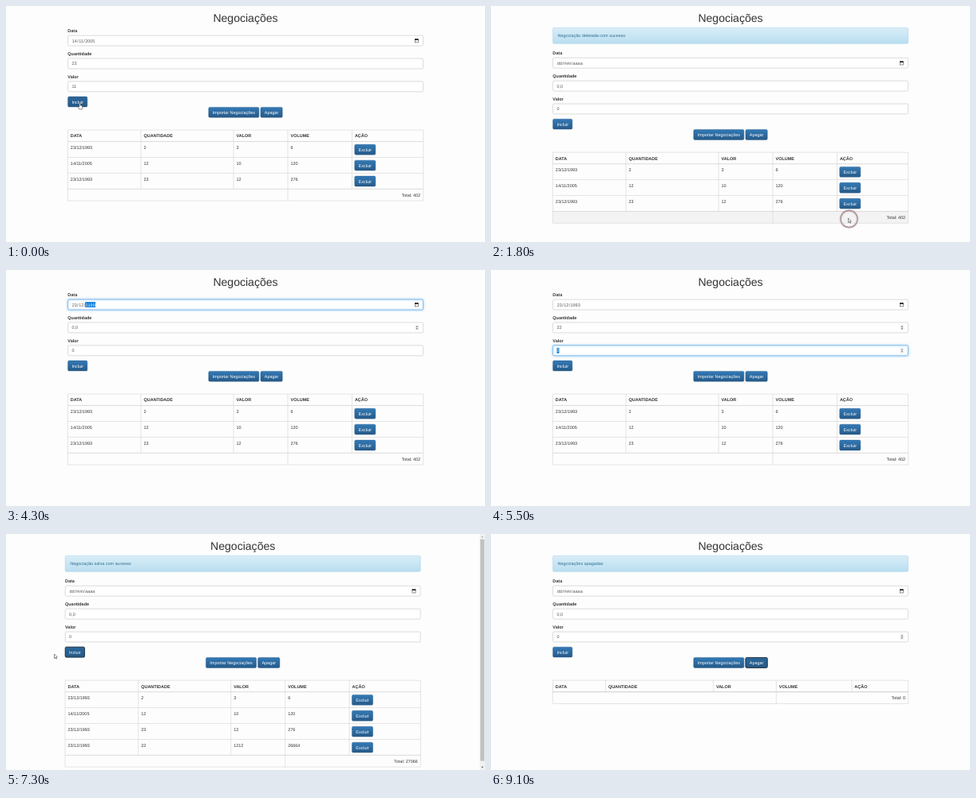
An HTML page with a canvas that plays this animation: 600 px wide and 297 px high, repeating every 9200 ms.

```html
<!DOCTYPE html>
<html lang="pt-BR">
<head>
<meta charset="utf-8">
<title>Negociações</title>
<style>
html, body { margin: 0; height: 100%; overflow: hidden; background: #fdfdfd; }
canvas { display: block; }
</style>
</head>
<body>
<canvas width="600" height="297"></canvas>
<script>
const ctx = document.querySelector('canvas').getContext('2d');
const LOOP = 9200, TICK = 100;
const U = 600 / 1536;              // one page pixel on the stage
const LEFT = 77.34, RIGHT = 522.66;
const FONT = 14 * U;

// Timelines: [start time, value]
const dates = [[0, '14/11/2005'], [400, 'dd/mm/aaaa'], [2900, '02/mm/aaaa'], [3200, '23/mm/aaaa'],
  [3500, '23/01/aaaa'], [3700, '23/12/aaaa'], [3800, '23/12/0001'], [4000, '23/12/0019'],
  [4200, '23/12/0199'], [4400, '23/12/1993'], [6700, 'dd/mm/aaaa']];
const amounts = [[0, '23'], [400, '0,0'], [4800, '2'], [4900, '22'], [6700, '0,0']];
const prices = [[0, '11'], [400, '0'], [5700, '1'], [5800, '12'], [5900, '121'], [6000, '1212'], [6700, '0']];
const focuses = [[0, ''], [400, 'Incluir'], [1700, ''], [2800, 'Data'], [4600, ''], [4700, 'Quantidade'],
  [5300, 'Valor'], [6300, 'Incluir'], [8300, 'Apagar']];
const selections = [[0, -1], [2800, 0], [3200, 2], [3800, 4], [4600, -1], [4700, 0], [4800, -1],
  [5300, 0], [5700, -1]];
const messages = [[0, ''], [400, 'Negociação salva com sucesso'], [1700, 'Negociação deletada com sucesso'],
  [3500, ''], [6700, 'Negociação salva com sucesso'], [8500, 'Negociações apagadas']];
const baseRows = [['23/12/1993', 2, 3], ['14/11/2005', 12, 10], ['23/12/1993', 23, 12]];
const tables = [[0, baseRows], [400, [...baseRows, ['14/11/2005', 23, 11]]], [1700, baseRows],
  [6700, [...baseRows, ['23/12/1993', 22, 1212]]], [8500, []]];
const path = [[0, 92.5, 122], [500, 92.5, 122], [1400, 447.5, 267], [1900, 447.5, 267], [2500, 71, 62],
  [2700, 84, 72], [7200, 84, 72], [7300, 60.5, 151], [8000, 329.5, 156.5], [8500, 329.5, 156.5],
  [9100, 320, 129], [LOOP, 320, 129]];
const clicks = [300, 1700, 2700, 8300];

const arrowShape = new Path2D('M0 0V5.5L1.3 4.4 2.2 6.3 3 6 2.1 4H3.8Z');
const handShape = new Path2D('M-.7 .6Q0-.3 .7 .6V3L3.1 3.8Q3.7 6.2 2.5 8H-.7L-2.4 5Q-2.2 4-.7 5Z');

const valueAt = (t, list) => list.findLast(([start]) => start <= t)[1];
const ease = (t, a, b) => {
  const p = Math.min(1, Math.max(0, (t - a) / (b - a)));
  return p * p * (3 - 2 * p);
};
function pointerAt(t) {
  const i = path.findIndex(([end]) => end > t);
  const [t0, x0, y0] = path[i - 1], [t1, x1, y1] = path[i];
  const p = ease(t, t0, t1);
  return [x0 + (x1 - x0) * p, y0 + (y1 - y0) * p];
}

let mouse, cursor, focus;
const over = (x, y, w, h) => mouse[0] >= x && mouse[0] < x + w && mouse[1] >= y && mouse[1] < y + h;

function setFont(size = FONT, weight = 'normal') {
  ctx.font = `${weight} ${size}px "Liberation Sans", Arial, sans-serif`;
}
function text(str, x, middle, { color = '#333', weight, size = FONT, align = 'left' } = {}) {
  setFont(size, weight);
  ctx.textAlign = align;
  ctx.fillStyle = color;
  ctx.fillText(str, x, middle + size * .358);
}
function box(x, y, w, h, fill, stroke, line = .6, radius = 1.56) {
  ctx.beginPath();
  ctx.roundRect(x, y, w, h, radius);
  ctx.fillStyle = fill;
  ctx.fill();
  ctx.strokeStyle = stroke;
  ctx.lineWidth = line;
  ctx.stroke();
}
function gradient(y, h, top, bottom) {
  const g = ctx.createLinearGradient(0, y, 0, y + h);
  g.addColorStop(0, top);
  g.addColorStop(1, bottom);
  return g;
}
function triangle(x, y, w, h, color = '#505050') {
  ctx.fillStyle = color;
  ctx.beginPath();
  ctx.moveTo(x - w, y);
  ctx.lineTo(x + w, y);
  ctx.lineTo(x, y + h);
  ctx.fill();
}

function buttonWidth(label) {
  setFont();
  return ctx.measureText(label).width + 26 * U;
}
function button(label, x, y) {
  const w = buttonWidth(label), h = 34 * U;
  const hovered = over(x, y, w, h), focused = focus === label;
  if (hovered) cursor = 'hand';
  const top = hovered || focused ? '#2b6699' : '#337ab7';
  box(x + .2, y + .2, w - .4, h - .4, gradient(y, h, top, '#265a88'), '#245580', .4);
  if (focused) {
    ctx.strokeStyle = '#1c2733';
    ctx.lineWidth = .8;
    ctx.stroke();
  }
  text(label, x + w / 2, y + h / 2, { color: '#fff', align: 'center' });
}

function calendarIcon(x, y) {
  ctx.fillStyle = '#222';
  ctx.fillRect(x - 2.3, y - 2.1, 4.6, 1.5);
  ctx.fillRect(x - 1.6, y - 2.7, .7, .8);
  ctx.fillRect(x + .9, y - 2.7, .7, .8);
  ctx.strokeStyle = '#222';
  ctx.lineWidth = .5;
  ctx.strokeRect(x - 2.05, y - 1.8, 4.1, 4.1);
}
function field(label, parts, y, selected) {
  const top = y + 25 * U, w = RIGHT - LEFT, h = 34 * U, middle = top + h / 2;
  const focused = focus === label, hovered = over(LEFT, top, w, h);
  const isDate = parts.length > 1;
  if (hovered) cursor = '';
  text(label, LEFT, y + 10 * U, { weight: 'bold' });
  ctx.save();
  if (focused) {
    ctx.shadowColor = 'rgba(102,175,233,.8)';
    ctx.shadowBlur = 3;
  }
  box(LEFT + .2, top + .2, w - .4, h - .4, '#fff', focused ? '#66afe9' : '#c8c8c8', .65);
  ctx.restore();
  let x = LEFT + 13 * U;
  parts.forEach((part, i) => {
    setFont();
    const pad = isDate && part !== '/' ? U : 0;
    const width = ctx.measureText(part).width + 2 * pad;
    const marked = focused && i === selected;
    if (marked) {
      ctx.fillStyle = '#0078d7';
      ctx.fillRect(x, middle - 3.3, width, 6.6);
    }
    text(part, x + pad, middle, { color: marked ? '#fff' : '#555' });
    x += width;
  });
  if (isDate) {
    calendarIcon(514.3, middle);
  } else if (focused || hovered) {
    ctx.fillStyle = '#f0f0f0';
    ctx.fillRect(512.2, middle - 3.5, 5.2, 7);
    triangle(514.8, middle - .8, 1.2, -1.4);
    triangle(514.8, middle + .8, 1.2, 1.4);
  }
}

function table(rows, y) {
  const columns = rows.length ? [LEFT, 169, 285, 353, 433.4, RIGHT] : [LEFT, 143.4, 278.4, 357.3, 451.8, RIGHT];
  const pad = 9 * U, headHeight = 37 * U, rowHeight = 51 * U, footHeight = 38 * U;
  const bodyTop = y + headHeight, footTop = bodyTop + rows.length * rowHeight, bottom = footTop + footHeight;
  const line = (x1, y1, x2, y2, width = .6) => {
    ctx.strokeStyle = '#d4d4d4';
    ctx.lineWidth = width;
    ctx.beginPath();
    ctx.moveTo(x1, y1);
    ctx.lineTo(x2, y2);
    ctx.stroke();
  };
  const highlight = (top, h) => {
    if (!over(LEFT, top, RIGHT - LEFT, h)) return;
    ctx.fillStyle = '#f3f3f3';
    ctx.fillRect(LEFT, top, RIGHT - LEFT, h);
  };
  ['DATA', 'QUANTIDADE', 'VALOR', 'VOLUME', 'AÇÃO'].forEach((name, i) =>
    text(name, columns[i] + pad, y + 19 * U, { weight: 'bold' }));
  let total = 0;
  rows.forEach(([date, amount, price], r) => {
    const top = bodyTop + r * rowHeight, volume = amount * price;
    total += volume;
    highlight(top, rowHeight);
    [date, amount, price, volume].forEach((cell, i) => text(cell, columns[i] + pad, top + 19 * U));
    button('Excluir', columns[4] + 8 * U, top + pad);
    if (r) line(LEFT, top, RIGHT, top);
  });
  highlight(footTop, footHeight);
  text('Total: ' + total, RIGHT - pad, footTop + 19.5 * U, { align: 'right' });
  line(LEFT, y, RIGHT, y);
  line(LEFT, bodyTop, RIGHT, bodyTop, .8);
  line(LEFT, footTop, RIGHT, footTop, .8);
  line(LEFT, bottom, RIGHT, bottom);
  columns.forEach((x, i) => line(x, y, x, [0, 3, 5].includes(i) ? bottom : footTop));
}

function scrollbar(offset) {
  const w = 17 * U, x = 600 - w;
  ctx.fillStyle = '#f1f1f1';
  ctx.fillRect(x, 0, w, 297);
  ctx.fillStyle = '#c1c1c1';
  ctx.fillRect(x + .8, w + offset, w - 1.6, 279);
  triangle(x + w / 2, 4.2, 1.4, -1.6, offset ? '#505050' : '#a3a3a3');
  triangle(x + w / 2, 292.8, 1.4, 1.6);
}

function drawPointer(t, x, y) {
  for (const start of clicks) {
    const age = t - start;
    if (age < 0 || age >= 500) continue;
    const [cx, cy] = pointerAt(start);
    ctx.save();
    ctx.globalAlpha = Math.min(1, (500 - age) / 300);
    ctx.shadowColor = 'rgba(0,0,0,.35)';
    ctx.shadowBlur = 2;
    ctx.strokeStyle = '#b58c98';
    ctx.lineWidth = 1.1;
    ctx.beginPath();
    ctx.arc(cx + 1, cy + 1, Math.min(10.6, 6 + age * .046), 0, 7);
    ctx.stroke();
    ctx.restore();
  }
  if (!cursor) return;
  const shape = cursor === 'hand' ? handShape : arrowShape;
  ctx.save();
  ctx.translate(x, y);
  ctx.fillStyle = '#fff';
  ctx.fill(shape);
  ctx.strokeStyle = '#333';
  ctx.lineWidth = .55;
  ctx.stroke(shape);
  ctx.restore();
}

function draw(t) {
  const rows = valueAt(t, tables), message = valueAt(t, messages), selected = valueAt(t, selections);
  const overflows = rows.length > 3;
  const shift = overflows ? -8.5 * U : 0;
  const scroll = overflows ? 4.6 * ease(t, 7400, 7800) : 0;
  const [px, py] = pointerAt(t);
  mouse = [px - shift, py + scroll];
  cursor = 'arrow';
  focus = valueAt(t, focuses);

  ctx.fillStyle = '#fdfdfd';
  ctx.fillRect(0, 0, 600, 297);
  ctx.save();
  ctx.translate(shift, -scroll);
  text('Negociações', 300, 15.4, { size: 36 * U, align: 'center' });
  let y = 69.6 * U;
  if (message) {
    const h = 52 * U;
    box(LEFT + .2, y + .2, RIGHT - LEFT - .4, h - .4, gradient(y, h, '#d9edf7', '#b9def0'), '#9acfea', .5);
    text(message, LEFT + 16 * U, y + h / 2, { color: '#31708f' });
    y += 72 * U;
  }
  field('Data', valueAt(t, dates).split(/(\/)/), y, selected);
  field('Quantidade', [valueAt(t, amounts)], y + 74 * U, selected);
  field('Valor', [valueAt(t, prices)], y + 148 * U, selected);
  y += 222 * U;
  button('Incluir', LEFT, y);
  y += 34 * U;
  const gap = 1.6, wide = buttonWidth('Importar Negociações');
  const x = 300 - (wide + gap + buttonWidth('Apagar')) / 2;
  button('Importar Negociações', x, y);
  button('Apagar', x + wide + gap, y);
  table(rows, y + 74 * U);
  ctx.restore();
  if (overflows) scrollbar(scroll);
  drawPointer(t, px, py);
}

ctx.textRendering = 'geometricPrecision';
(function frame() {
  const t = performance.now() % LOOP;
  draw(Math.floor(t / TICK) * TICK);
  requestAnimationFrame(frame);
})();
</script>
</body>
</html>
```
